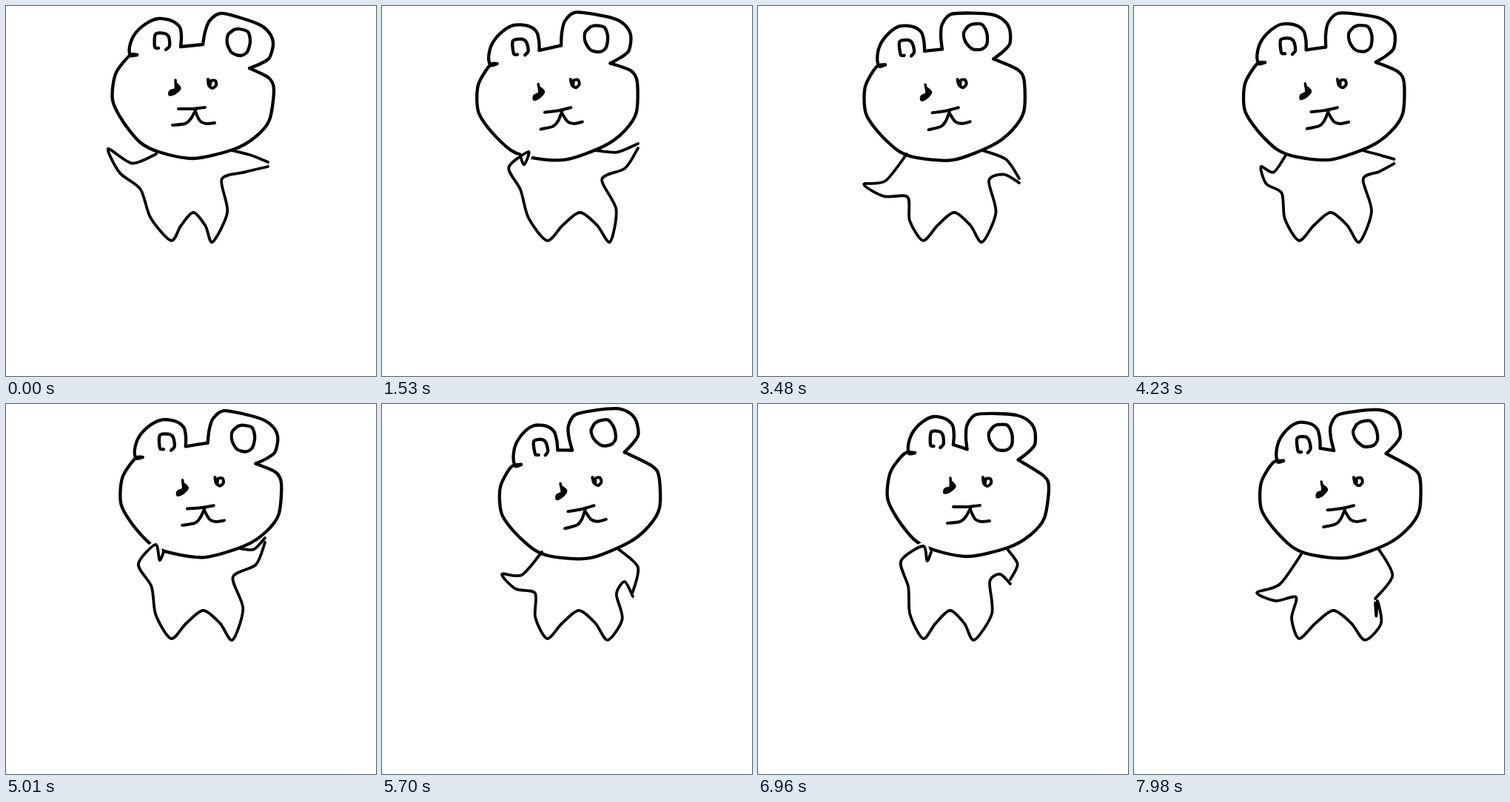
Recreate the animation shown at these times as an HTML page with a canvas. Size 500 px wide and 500 px high, loop 8000 ms.

```html
<!DOCTYPE html>
<html>
<head>
<meta charset="utf-8">
<style>
  html, body { margin: 0; height: 100%; overflow: hidden; background: #fff; }
  canvas { display: block; }
</style>
</head>
<body>
<canvas id="stage" width="500" height="500"></canvas>
<script>
const ctx = document.getElementById("stage").getContext("2d");
const LOOP = 8000, STEP = 30;

const points = text => text.split(" ").map(p => p.split(",").map(Number));

// Head parts, measured from the point between the eyes.
const skull = points("-86,-41 -105,-16 -109,19 -95,48 -72,76 -47,89 0,98 54,86 84,69 103,46 109,5 102,-11");
const eyes = [
  points("-24,-8 -24,4 -31,7 -32,12 -25,10 -18,3 -24,-4"),
  points("20,-9 21,-1 26,3 31,-1 30,-7 24,-7 23,-2")
];
const mouth = [
  points("-20,31 -2,31 16,29"),
  points("4,31 -3,44 -11,51 -28,53"),
  points("3,35 9,47 18,51 29,50")
];

// Ears, measured from their own centres.
const leftEar = points("-33,18 -42,19 -43,7 -36,-10 -21,-24 -4,-31 14,-28 25,-19 27,-6 26,7");
const rightEar = points("-48,3 -45,-14 -39,-29 -24,-39 3,-33 30,-23 43,-11 47,3 42,21 30,29 15,35");
const leftInner = points("-4,9 -9,7 -8,-10 4,-11 10,-6 11,6 6,11");
const rightInner = points("-6,-17 -14,-10 -15,2 -9,14 3,18 12,13 16,-1 13,-14 1,-18 -6,-17");

// time, head x, lean, ear squeeze, left hand x y, right hand x y, right foot x
const keys = [
  [0,    253, 0,    0,  138, 193, 354, 214, 279],
  [1530, 236, -7,   0,  198, 197, 346, 189, 308],
  [3480, 251, -8,   9,  143, 241, 353, 236, 303],
  [5010, 263, -3.5, 0,  202, 190, 350, 184, 306],
  [5700, 266, -9.5, 17, 162, 230, 339, 257, 305],
  [6960, 284, 0,    17, 223, 192, 341, 240, 292],
  [7980, 278, -6.5, 19, 166, 255, 326, 266, 312]
];

function poseAt(t) {
  const next = Math.max(1, keys.findIndex(key => key[0] >= t));
  const a = keys[next - 1], b = keys[next];
  const u = Math.min(1, (t - a[0]) / (b[0] - a[0]));
  const mix = (1 - Math.cos(Math.PI * u)) / 2;
  const sway = Math.sin(2 * Math.PI * u);
  const [, x, lean, ear, lx, ly, rx, ry, footX] = a.map((v, i) => v + (b[i] - v) * mix);
  return {
    t, ear, footX,
    x: x - 13 * sway,
    lean: lean - 3 * sway,
    left: [lx, ly + 14 * sway],
    right: [rx, ry - 14 * sway]
  };
}

function place(shape, [x, y], degrees, scaleX = 1) {
  const c = Math.cos(degrees * Math.PI / 180), s = Math.sin(degrees * Math.PI / 180);
  return shape.map(([px, py]) => [x + px * scaleX * c - py * s, y + px * scaleX * s + py * c]);
}

// Point beside the middle of a-b, at the given distance to its right-hand side.
function bow(a, b, height) {
  const dx = b[0] - a[0], dy = b[1] - a[1], length = Math.hypot(dx, dy) || 1;
  return [(a[0] + b[0]) / 2 - dy / length * height, (a[1] + b[1]) / 2 + dx / length * height];
}

// Loose curve through all points; a low bend keeps the corners.
function draw(line, { width = 4.3, color = "#000", fill = false } = {}) {
  const at = i => line[Math.max(0, Math.min(line.length - 1, i))];
  const control = (i, side) => [0, 1].map(k => at(i)[k] + side * 0.14 * (at(i + 1)[k] - at(i - 1)[k]));
  ctx.beginPath();
  ctx.moveTo(...line[0]);
  for (let i = 1; i < line.length; i++) {
    ctx.bezierCurveTo(...control(i - 1, 1), ...control(i, -1), ...line[i]);
  }
  ctx.lineWidth = width;
  ctx.strokeStyle = color;
  ctx.stroke();
  if (fill) ctx.fill();
}

function drawHead({ x, lean, ear }) {
  const centre = [x, 108 - lean * 0.35];
  const [leftAt, rightAt] = place(points("-43,-60 61,-59"), centre, lean);
  rightAt[0] -= ear;
  rightAt[1] -= ear * 0.2;
  const onLeft = shape => place(shape, leftAt, lean, 1 - ear * 0.007);
  const onRight = shape => place(shape, rightAt, lean - ear * 0.9);
  const onFace = shape => place(shape, centre, lean);

  const earL = onLeft(leftEar), earR = onRight(rightEar);
  draw([earL[0], ...onFace(skull), earR.at(-1)]);
  draw(earL);
  draw(earR);
  draw([earL.at(-1), earR[0]]);
  draw(onLeft(leftInner));
  draw(onRight(rightInner));
  draw(onFace(eyes[0]), { width: 3.5, fill: true });
  draw(onFace(eyes[1]), { width: 4 });
  mouth.forEach(line => draw(onFace(line), { width: 4 }));
}

function drawBody({ t, x, left, right, footX }) {
  const shoulderL = [x - 50, 200], shoulderR = [x + 52, 195];
  const hip = 181 + t / 320 + (left[1] - 190) * 0.2;
  const pitL = [hip, 205 + left[1] * 0.22];
  const pitR = [hip + 110, Math.max(234, right[1])];
  const footL = [223, 317], footR = [footX, 319];
  const crotch = [(footL[0] + footX) / 2 + 2, 279];

  // The left elbow sticks out when the hand comes near the shoulder.
  const reach = Math.hypot(left[0] - shoulderL[0], left[1] - shoulderL[1]);
  const elbowL = bow(left, pitL, 8 + Math.max(0, 20 - reach / 2));
  const [midX, midY] = bow(shoulderL, left, 0);
  const armL = [shoulderL, [midX, midY + 16], left, elbowL];

  draw(armL.slice(1), { width: 10, color: "#fff" });
  draw([
    ...armL, pitL, bow(pitL, footL, 8), footL,
    bow(footL, crotch, -2), crotch, bow(crotch, footR, -4), footR,
    bow(footR, pitR, 14), pitR,
    bow(pitR, right, (215 - right[1]) * 0.4), [right[0], right[1] + 3]
  ], { width: 3.8 });
  draw([
    [right[0], right[1] - 3], bow(right, shoulderR, (right[1] - 205) * 0.35), shoulderR
  ], { width: 3.8 });
}

function frame() {
  const t = performance.now() % LOOP;
  const pose = poseAt(Math.min(7980, Math.floor(t / STEP) * STEP));
  ctx.fillStyle = "#fff";
  ctx.fillRect(0, 0, 500, 500);
  ctx.fillStyle = "#000";
  ctx.lineCap = ctx.lineJoin = "round";
  drawHead(pose);
  drawBody(pose);
  requestAnimationFrame(frame);
}
frame();
</script>
</body>
</html>
```
